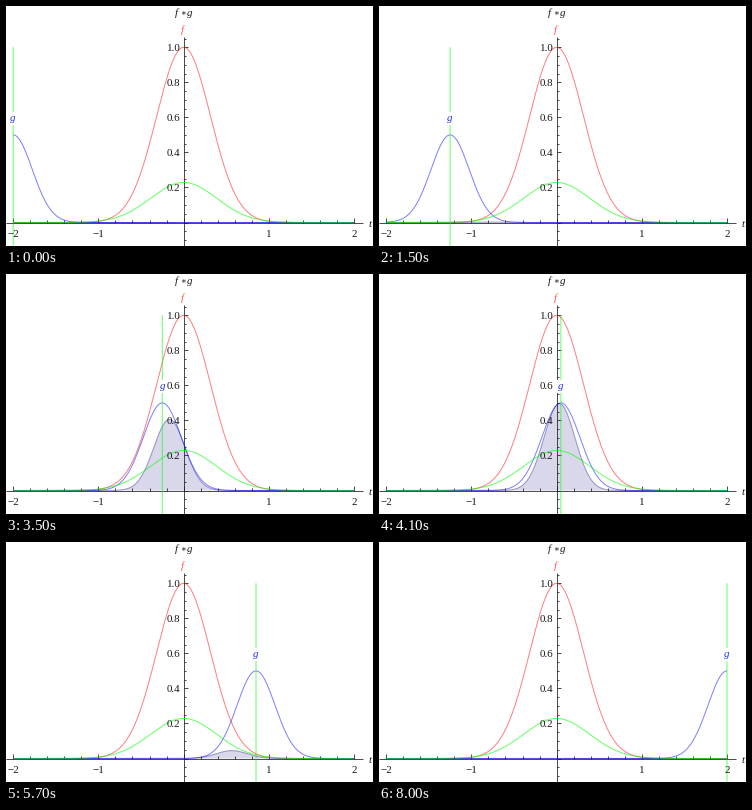
A matplotlib script that plays this animation: 367 by 240 pixels, repeating every 8.1 s.

```python
import numpy as np
import matplotlib.pyplot as plt
from matplotlib.animation import FuncAnimation
from matplotlib.patches import Rectangle

WIDTH, HEIGHT, DPI = 367, 240, 64
PX = 72 / DPI
FRAMES, INTERVAL = 81, 100
T = np.linspace(-2, 2, 601)

RED, GREEN, BLUE = "#ff0000", "#00ff00", "#0000ff"
OVERLAP = (0.247, 0.24, 0.6)


def px(t):
    return 177.6 + 85.2 * np.asarray(t)


def py(v):
    return 216.5 - 175.2 * np.asarray(v)


def f(t):
    return np.exp(-5 * t**2)


def g(t):
    return 0.5 * np.exp(-10 * t**2)


def convolution(t):
    return 0.5 * np.sqrt(np.pi / 15) * np.exp(-10 / 3 * t**2)


fig = plt.figure(figsize=(WIDTH / DPI, HEIGHT / DPI), dpi=DPI, facecolor="white")
ax = fig.add_axes([0, 0, 1, 1])
ax.set(xlim=(0, WIDTH), ylim=(HEIGHT, 0))
ax.axis("off")


def line(x, y, color, width=1.0, alpha=0.5, z=4, snap=False):
    return ax.plot(x, y, color=color, lw=width * PX, alpha=alpha, zorder=z,
                   snap=snap, solid_capstyle="butt")[0]


def axis_line(x, y):
    line(x, y, "#202020", width=0.8, alpha=1, z=2, snap=True)


def label(x, baseline, text, color="#181818", italic=False, ha="center", size=11):
    return ax.text(x, baseline, text, color=color, ha=ha, va="baseline",
                   family=["Liberation Serif", "DejaVu Serif"],
                   style="italic" if italic else "normal",
                   fontsize=size * PX, zorder=6)


def draw_axes():
    x0, y0 = float(px(0)), float(py(0))
    axis_line([0, 357], [y0, y0])
    axis_line([x0, x0], [31, HEIGHT])
    for i in range(-10, 11):
        x = float(px(i / 5))
        major = i % 5 == 0
        axis_line([x, x], [y0, y0 - (4.5 if major else 2.8)])
        if major and i:
            label(x, 230.7, str(i // 5).replace("-", "\u2212"))
    for i in range(-2, 22):
        y = float(py(i / 20))
        major = i % 4 == 0
        axis_line([x0, x0 + (4.5 if major else 2.8)], [y, y])
        if major and i > 0:
            label(174.5, y + 3.9, f"{i / 20:.1f}", ha="right")


draw_axes()
label(364, 221.3, "t", italic=True)
label(176.8, 27, "f", "#ff5a48", italic=True)
for x, symbol in ((170.8, "f"), (177, "\u2217"), (184, "g")):
    label(x, 10, symbol, italic=True, size=8.5 if symbol == "\u2217" else 11)

area = ax.fill(px(T), py(0 * T), color=OVERLAP, alpha=0.2, lw=0, zorder=1)[0]
line(px(T), py(f(T)), RED)
product_curve = line(px(T), py(0 * T), OVERLAP)
g_curve = line(px(T), py(g(T)), BLUE)
line(px(T), py(convolution(T)), GREEN, alpha=0.6)
marker = line([0, 0], [py(1), HEIGHT], GREEN, alpha=0.6)
g_box = ax.add_patch(Rectangle((0, 105.5), 8, 13, fc="white", ec="none", zorder=5))
g_label = label(0, 114.6, "g", "#2430f0", italic=True)


def update(frame):
    shift = -2 + frame * 0.05
    x = float(px(shift))
    shifted = g(T - shift)
    product = f(T) * shifted
    g_curve.set_ydata(py(shifted))
    product_curve.set_ydata(py(product))
    area.set_xy(np.column_stack([
        np.r_[px(T), px(2), px(-2)],
        np.r_[py(product), py(0), py(0)],
    ]))
    marker.set_xdata([x, x])
    g_box.set_x(x - 4)
    g_label.set_x(x)
    return g_curve, product_curve, area, marker, g_box, g_label


anim = FuncAnimation(fig, update, frames=FRAMES, interval=INTERVAL,
                     repeat=True, repeat_delay=0, blit=False)
plt.show()
```
